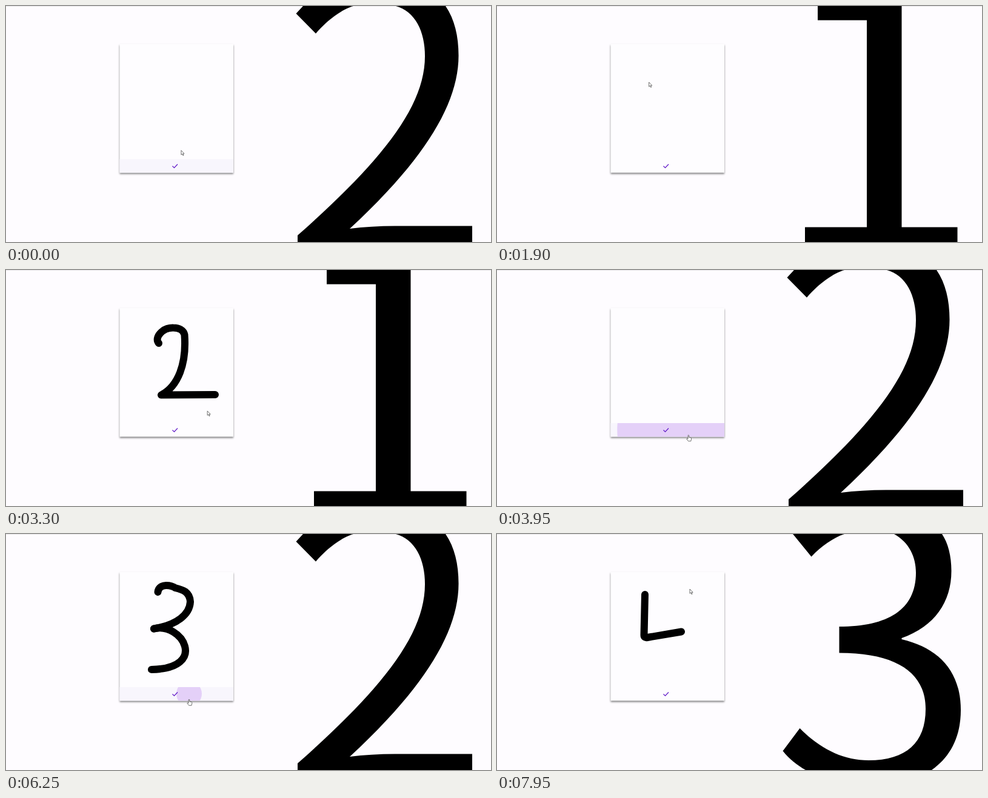
An HTML page that plays this animation: 800x390 px, repeating every 8 s.

```html
<!DOCTYPE html>
<html lang="en">
<head>
<meta charset="utf-8">
<title>Handwritten digits</title>
<style>
  html, body { margin: 0; width: 100%; height: 100%; overflow: hidden; background: #fefcff; }
  svg { display: block; width: 100%; height: 100%; }
  .card { fill: #fefdff; filter: drop-shadow(0 2px 1.5px rgba(0, 0, 0, .5)); }
  .ink path { fill: none; stroke: #000; stroke-width: 12; stroke-linecap: round; stroke-linejoin: round; }
  .check { fill: none; stroke: #6018c8; stroke-width: 1.2; }
  .cursor path { fill: #fff; stroke: #444; stroke-width: .75; stroke-linejoin: round; }
</style>
</head>
<body>
<svg viewBox="0 0 800 390">
  <defs><clipPath id="button"><rect x="187.5" y="253" width="187.5" height="22.5"/></clipPath></defs>
  <rect width="800" height="1" fill="#e8e6e9"/>
  <g id="digits">
    <path d="M529 0H667.5V365.5H759.5V390H508V365.5H610V23.5H529Z"/>
    <path d="M478.5 12.5L511 45.5C532 21 556 5 573 0H643C675 9 691 42 691 83C691 166 621 255 481 379V392H769V363.5H642C615 363.5 590 365 567 368C690 254 746.5 162 746.5 82C746.5 50 740 22 725 0V-20H490V0Z"/>
    <path d="M488 0L518.5 37.5C535 20 555 6 573 0H655C680 14 691 38 691 64C691 125 645 153 564.5 153V196.5C660 196.5 707 230 707 289C707 345 675 374 613 374C570 374 532 354 499.5 321L471.5 358.5C482 372 495 382 509 390H717C748 368 765 335 765 291C765 225 727 188 667.5 174V172C722 153 749.5 112 749.5 61C749.5 36 744 15 734 0V-20H488Z"/>
  </g>
  <rect class="card" x="187.5" y="63" width="187.5" height="212.5"/>
  <g clip-path="url(#button)">
    <rect id="hover" x="187" y="253" width="189" height="23" fill="#f8f6fd"/>
    <circle id="ripple" cy="264" fill="#e4d0f8"/>
  </g>
  <path class="check" d="M274.5 264.5l3 3 5.5-6"/>
  <g class="ink" id="ink"></g>
  <g class="cursor" id="cursor">
    <path d="M0 0V7.3L1.7 5.8 3 8.6 4.1 8.1 2.9 5.4H5.1Z"/>
    <path d="M-.8 .8Q0-.5 .8 .8V4L4 4.6Q5 5 4.8 6.5L4 10.3H-.3L-3.2 6.5Q-3 5.3-.8 6.5Z"/>
  </g>
</svg>
<script>
const LOOP = 8000;
const BUTTON_TOP = 253;
const byId = id => document.getElementById(id);
const progress = (t, from, to) => Math.max(0, Math.min(1, (t - from) / (to - from)));
const easeOut = p => 1 - (1 - p) ** 2;
const mix = (a, b, p) => a + (b - a) * p;
const show = (el, on) => { el.style.display = on ? '' : 'none'; };

// Each press sends the drawing; the recognised digit replaces it shortly after
const presses = [
  { time: 1300, x: 269, answered: 1350, digit: 1 },
  { time: 3800, x: 316, answered: 3850, digit: 2 },
  { time: 6230, x: 302, answered: 6400, digit: 3 }
];

function pen(start, end, d) {
  const path = document.createElementNS('http://www.w3.org/2000/svg', 'path');
  path.setAttribute('d', d);
  byId('ink').append(path);
  const length = path.getTotalLength();
  path.style.strokeDasharray = `${length} ${length + 20}`;
  const erased = presses.find(p => p.answered > end)?.answered ?? LOOP;
  return { start, end, erased, path, length };
}

const strokes = [
  pen(350, 800, 'M275 85Q276.5 150 274.5 215'),
  pen(2000, 3100, 'M252 121C244 112 258 95 276 95.5 286 95.5 293 100 294.5 107 298 155 284 192 256 206.5L345 206'),
  pen(4700, 5300, 'M250.5 96C252 80 275 85 279 89 291 92 303 95 304 112 303 133 282 150 244 156.5'),
  pen(5300, 5800, 'M244 156.5C290 145 335 222 240 224'),
  pen(7250, 7700, 'M244 100L242.5 167Q242.5 172 248 171L304 161.5')
];

function penAt(stroke, t) {
  const { x, y } = stroke.path.getPointAtLength(stroke.length * progress(t, stroke.start, stroke.end));
  return { time: t, x: x - 2, y };
}

// The cursor travels between pen strokes and the button
const stops = [
  { time: 0, x: 289, y: 239 },
  ...strokes.flatMap(s => [penAt(s, s.start), penAt(s, s.end)]),
  ...presses.flatMap(({ time, x }) => [-200, 150].map(shift => ({ time: time + shift, x, y: 273 }))),
  { time: 7950, x: 318, y: 91 }
].sort((a, b) => a.time - b.time);

function cursorAt(t) {
  const drawing = strokes.find(s => t >= s.start && t < s.end);
  if (drawing) return penAt(drawing, t);
  const to = stops.find(s => s.time > t);
  if (!to) return stops.at(-1);
  const from = stops[stops.indexOf(to) - 1];
  const linear = progress(t, from.time, to.time);
  const p = from.y > BUTTON_TOP ? easeOut(linear) : linear;
  return { x: mix(from.x, to.x, p), y: mix(from.y, to.y, p) };
}

function render(t) {
  const digit = presses.findLast(p => p.answered <= t)?.digit ?? 2;
  [...byId('digits').children].forEach((el, i) => show(el, i === digit - 1));

  for (const s of strokes) {
    show(s.path, t >= s.start && t < s.erased);
    s.path.style.strokeDashoffset = s.length * (1 - progress(t, s.start, s.end));
  }

  const { x, y } = cursorAt(t);
  const overButton = y >= BUTTON_TOP;
  const [arrow, hand] = byId('cursor').children;
  byId('cursor').setAttribute('transform', `translate(${x} ${y})`);
  show(arrow, !overButton);
  show(hand, overButton);
  show(byId('hover'), overButton || t < presses[0].time);

  const press = presses.findLast(p => p.time <= t);
  const ripple = byId('ripple');
  show(ripple, press);
  if (press) {
    const age = t - press.time;
    ripple.setAttribute('cx', press.x);
    ripple.setAttribute('r', mix(0, press.x - 184, easeOut(progress(age, 0, 225))));
    ripple.setAttribute('opacity', 1 - progress(age, 180, 400));
  }
}

const begin = performance.now();
function tick() {
  render((performance.now() - begin) % LOOP);
  requestAnimationFrame(tick);
}
tick();
</script>
</body>
</html>
```
